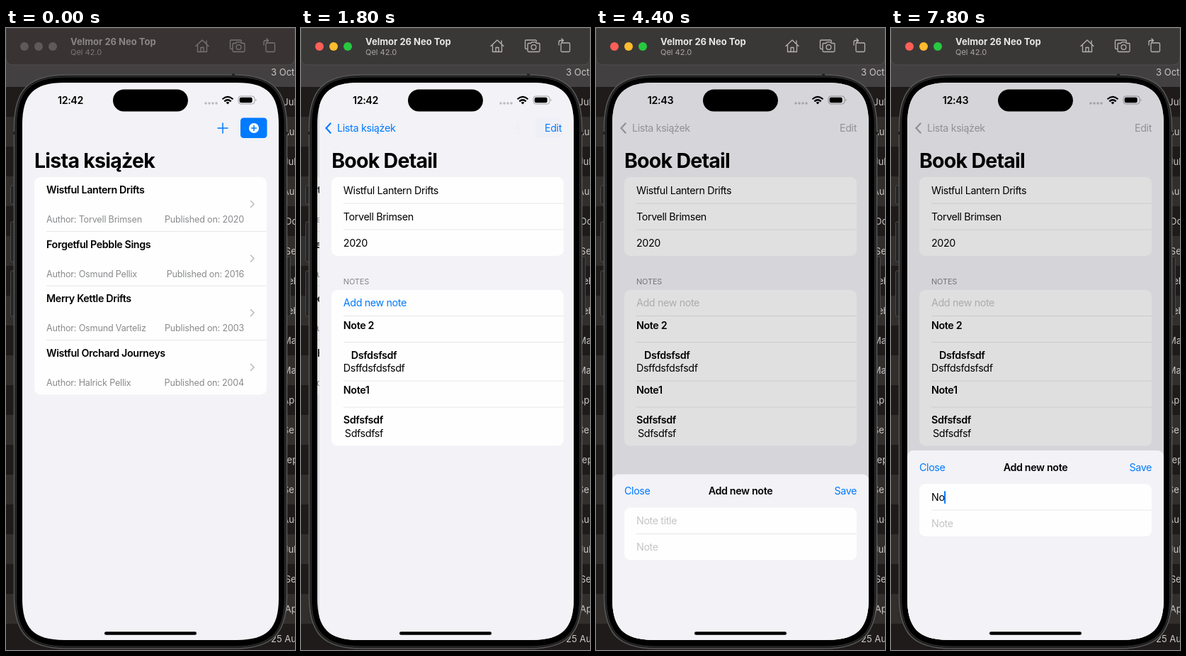
An HTML page that plays this animation: 408x876 px, repeating every 8 s.

```html
<!DOCTYPE html>
<html lang="en">
<head>
<meta charset="utf-8">
<title>Book list simulator</title>
<style>
  html, body { margin: 0; width: 100%; height: 100%; overflow: hidden; background: #262220; }
  svg { display: block; width: 408px; height: 876px; }
  text { font-family: Inter, "Open Sans", sans-serif; font-size: 14.28px; letter-spacing: -.025em; white-space: pre; fill: #000; }
  .semi { font-weight: 600; }
  .h1 { font-size: 28.5px; font-weight: 700; letter-spacing: -.026em; }
  .sub { font-size: 12.6px; letter-spacing: -.015em; fill: #8a8a8e; }
  .cap { font-size: 10.9px; letter-spacing: -.01em; fill: #858589; }
  .date { font-size: 13px; letter-spacing: 0; fill: #cbc8c6; }
  .blue { fill: #007aff; }
  .hint { fill: #c5c5c8; }
  .end { text-anchor: end; }
  .mid { text-anchor: middle; }
  .card { fill: #fdfefd; }
  .page { fill: #f2f2f7; }
  .line { stroke: #e0e0e3; stroke-width: .8; }
  .tint { fill: #007aff; stroke: none; }
  .modal .tint { fill: #a5a5a9; }
  .modal .add { fill: #c3c3c6; }
  .stroke { fill: none; stroke-linecap: round; stroke-linejoin: round; }
  #bar text { letter-spacing: 0; }
  #top { fill: #3a3837; stroke: #514f4e; }
  #name { font-size: 13px; font-weight: 700; fill: #e8e6e5; }
  #system { font-size: 11px; fill: #a9a6a5; }
  #icons { stroke: #b5b2b1; stroke-width: 1.3; }
  .idle #top { fill: #393433; }
  .idle #name { fill: #8a8685; }
  .idle #system { fill: #7b7776; }
  .idle #icons { stroke: #787473; }
  .idle #lights circle { fill: #5f5a59; }
  .button { fill: #262525; stroke: #4a4949; }
</style>
</head>
<body>
<svg id="stage" viewBox="0 0 408 876">
  <defs>
    <clipPath id="glass"><path id="glassEdge"/></clipPath>
  </defs>

  <g id="desk"></g>

  <g id="bar">
    <path id="top" d="M0 0H408V42Q408 52 398 52H10Q0 52 0 42Z"/>
    <g id="lights">
      <circle cx="26" cy="26" r="6" fill="#fe5f57"/>
      <circle cx="46" cy="26" r="6" fill="#febc2e"/>
      <circle cx="66" cy="26" r="6" fill="#28c840"/>
    </g>
    <text id="name" x="91" y="24">Velmor 26 Neo Top</text>
    <text id="system" x="91" y="38">Qel 42.0</text>
    <g id="icons" class="stroke">
      <path d="M268 25.500L277 17L286 25.500M270.500 24V33.500H283.500V24M275 33V27.500H279V33M283 18V22"/>
      <path d="M319 29.500H317.500Q316.500 29.500 316.500 28V18.500Q316.500 17 318 17H331Q332.500 17 332.500 19"/>
      <path d="M321.500 21.500H324.500L326 19.800H331L332.500 21.500H336Q337 21.500 337 22.500V32Q337 33.500 335.500 33.500H321.500Q320 33.500 320 32V23Q320 21.500 321.500 21.500Z"/>
      <circle cx="328.500" cy="27" r="3.400"/>
      <rect x="367" y="21" width="12.500" height="12.500" rx="1.500"/>
      <path d="M364 24V20Q364 17.500 366.500 17.500H370M368 15L370.500 17.500L368 20"/>
    </g>
  </g>

  <g id="phone">
    <rect class="button" x="6.500" y="222" width="7" height="26" rx="1.500"/>
    <rect class="button" x="6.500" y="273" width="7" height="56" rx="1.500"/>
    <rect class="button" x="6.500" y="342" width="7" height="64" rx="1.500"/>
    <rect class="button" x="394" y="322" width="7.500" height="84" rx="1.500"/>
    <path id="frame" fill="#1b1b1b" stroke="#585757" stroke-width="1.600"/>
    <path id="bezel" fill="#000" stroke="#333"/>
    <path d="M319 66H323M11.500 146V150M396.500 146V150" stroke="#222" stroke-width="3"/>
  </g>

  <g id="screen" clip-path="url(#glass)">
    <rect class="page" x="23" y="77" width="362" height="785"/>
    <g id="list"></g>
    <rect id="listDim" x="23" y="77" width="362" height="785"/>
    <g id="detail">
      <rect class="page" x="23" y="77" width="362" height="785"/>
      <g id="rows"></g>
    </g>
    <g id="tools">
      <path class="stroke" d="M299 141H313M306 134V148" stroke="#007aff" stroke-width="1.500"/>
      <rect x="331" y="126.500" width="37.500" height="28.500" rx="4.500" fill="#007aff"/>
      <circle cx="350" cy="141" r="7" fill="#fff"/>
      <path class="stroke" d="M346.500 141H353.500M350 137.500V144.500" stroke="#007aff" stroke-width="1.600"/>
    </g>
    <text id="listTitle" class="h1">Lista książek</text>
    <text id="backTitle" class="tint">Lista książek</text>
    <path id="chevron" class="tint" d="M41.400 133L34 141L41.400 149L43 147.600L37 141L43 134.400Z"/>
    <text id="edit" class="tint end" x="368" y="146">Edit</text>
    <text id="detailTitle" class="h1" x="40" y="197">Book Detail</text>
    <g id="status">
      <text id="clock" class="semi mid" x="91" y="107"></text>
      <g fill="#b9b9be">
        <circle cx="282" cy="106" r="1.700"/><circle cx="287" cy="106" r="1.700"/>
        <circle cx="292" cy="106" r="1.700"/><circle cx="297" cy="106" r="1.700"/>
      </g>
      <g fill="none" stroke="#000" stroke-width="2.200">
        <path d="M305.500 100.300Q313 93.500 320.500 100.300M308.300 103.300Q313 99.200 317.700 103.300"/>
        <path d="M313 107.500L310.600 105Q313 103 315.400 105Z" fill="#000" stroke="none"/>
      </g>
      <rect x="328" y="96" width="23" height="11" rx="3.500" fill="none" stroke="#a0a0a4"/>
      <rect x="329.700" y="97.700" width="18" height="7.600" rx="2.200"/>
      <path d="M352.500 99.500Q354.500 101.500 352.500 103.500Z" fill="#a0a0a4"/>
    </g>
    <rect id="dim" x="23" y="77" width="362" height="785"/>
    <g id="sheet"></g>
    <rect x="139" y="850.300" width="130" height="4.400" rx="2.200"/>
  </g>
  <rect x="151" y="86.500" width="106" height="31" rx="15.500"/>
</svg>

<script>
const LOOP = 8000, STEP = 200;
const $ = id => document.getElementById(id);

const text = (x, y, s, cls = "") => `<text x="${x}" y="${y}" class="${cls}">${s}</text>`;
const rect = (x, y, w, h, cls, rx = 0) => `<rect x="${x}" y="${y}" width="${w}" height="${h}" rx="${rx}" class="${cls}"/>`;
const card = (y, h) => rect(40, y, 328, h, "card", 8.5);
const line = y => `<path class="line" d="M57 ${y}H368"/>`;

// Rectangle with continuous-curvature corners
function squircle(x, y, w, h, r) {
  const e = 1.28 * r, k = .277 * e;
  return `M${x + e} ${y}h${w - 2 * e}c${e - k} 0 ${e} ${k} ${e} ${e}`
    + `v${h - 2 * e}c0 ${e - k} ${-k} ${e} ${-e} ${e}`
    + `h${2 * e - w}c${k - e} 0 ${-e} ${-k} ${-e} ${-e}`
    + `v${2 * e - h}c0 ${k - e} ${k} ${-e} ${e} ${-e}z`;
}
$("glassEdge").setAttribute("d", squircle(23, 77, 362, 785, 46));
$("frame").setAttribute("d", squircle(11.5, 66, 385, 808, 58));
$("bezel").setAttribute("d", squircle(14.5, 69, 379, 802, 55));

// File list behind the simulator
const dates = "3 Oct,14 Jul,12 Aug,10 Jul,21 Aug,22 Oct,20 Sep,13 Feb,12 Feb,13 Mar,12 Mar,17 Apr,18 Sep,11 Sep,18 Sep,17 Aug,10 Jul,24 Sep,20 Apr,25 Aug".split(",");
$("desk").innerHTML = dates.map((d, i) =>
  `<rect y="${41 + 42 * i}" width="408" height="42" fill="${i ? i % 2 ? "#1f1b1a" : "#322e2c" : "#424040"}"/>`
  + text(374, 66.5 + 42 * i, d, "date")).join("");

const books = [
  ["Wistful Lantern Drifts", "Torvell Brimsen", 2020],
  ["Forgetful Pebble Sings", "Osmund Pellix", 2016],
  ["Merry Kettle Drifts", "Osmund Varteliz", 2003],
  ["Wistful Orchard Journeys", "Halrick Pellix", 2004]
];
$("list").innerHTML = card(210, 306.5) + books.map(([title, author, year], i) => {
  const y = 210 + 76.6 * i;
  return (i ? line(y) : "")
    + text(57, y + 23, title, "semi")
    + text(57, y + 64, "Author: " + author, "sub")
    + text(336, y + 64, "Published on: " + year, "sub end")
    + `<path class="stroke" d="M345.500 ${y + 33.500}l4.500 4.500l-4.500 4.500" stroke="#c2c2c6" stroke-width="1.700"/>`;
}).join("");

$("rows").innerHTML = card(210, 111) + line(247) + line(284)
  + books[0].map((s, i) => text(57, 234 + 37 * i, s)).join("")
  + text(57, 361, "NOTES", "cap")
  + card(369, 219.5) + [405.5, 442.5, 497, 534].map(line).join("")
  + text(57, 392, "Add new note", "blue add")
  + text(57, 423.5, "Note 2", "semi")
  + text(68, 465.5, "Dsfdsfsdf", "semi")
  + text(57, 484, "Dsffdsfdsfsdf")
  + text(57, 515, "Note1", "semi")
  + text(57, 557, "Sdfsfsdf", "semi")
  + text(59, 576, "Sdfsdfsf");

// Drawn with its top edge at y = 0
$("sheet").innerHTML = rect(23, 0, 362, 400, "page", 8.5)
  + text(40, 29, "Close", "blue")
  + text(204, 29, "Add new note", "semi mid")
  + text(368, 29, "Save", "blue end")
  + card(47, 74) + line(84)
  + text(57, 71, "Note title", "hint")
  + text(57, 108, "Note", "hint")
  + rect(56.5, 57, 2, 18, "blue", 1);
const field = $("sheet").querySelector(".hint"), caret = $("sheet").lastElementChild;

// Critically damped spring from 0 to 1
const spring = (ms, rate = .0132) => {
  const k = Math.max(0, ms) * rate;
  return 1 - (1 + k) * Math.exp(-k);
};
const fade = (id, v) => $(id).setAttribute("opacity", Math.min(1, Math.max(0, v)));
const move = (id, x, y = 0, s = 1) => $(id).setAttribute("transform", `translate(${x} ${y}) scale(${s})`);

function push(t) {
  const p = t < 2000 ? spring(t - 1276) : 1, q = p ** 1.17, soft = p ** 1.4;
  const shrink = 1 - .526 * q, x = 40 + 11 * q, y = 197 - 51 * q;
  move("list", -108 * p);
  fade("listDim", .1 * p);
  move("detail", 362 * (1 - p));
  move("detailTitle", 408 * (1 - p));
  fade("detailTitle", p * 1.8);
  move("listTitle", x, y, shrink);
  fade("listTitle", 1 - p);
  move("backTitle", x, y, shrink / .474);
  fade("backTitle", p * 1.3);
  fade("tools", 1 - soft);
  fade("edit", soft);
  fade("chevron", 2 * p - 1);
}

function modal(t) {
  const up = spring(t - 3953);
  $("screen").classList.toggle("modal", t >= 4000);
  fade("dim", .12 * up);
  move("sheet", 0, 862 - 238 * up - 29 * spring(t - 5950));

  const typed = "No".slice(0, t < 7600 ? 0 : t < 7800 ? 1 : 2);
  field.textContent = typed || "Note title";
  field.setAttribute("class", typed ? "" : "hint");
  caret.setAttribute("x", 56.5 + (typed ? field.getComputedTextLength() : 0));
  caret.setAttribute("opacity", t >= 5600 && (t - 5600) % 1000 < 500 ? 1 : 0);
}

function draw() {
  const t = Math.floor(performance.now() % LOOP / STEP) * STEP;
  $("bar").setAttribute("class", t < 200 ? "idle" : "");
  $("clock").textContent = t < 3400 ? "12:42" : "12:43";
  push(t);
  modal(t);
  requestAnimationFrame(draw);
}
draw();
</script>
</body>
</html>
```
